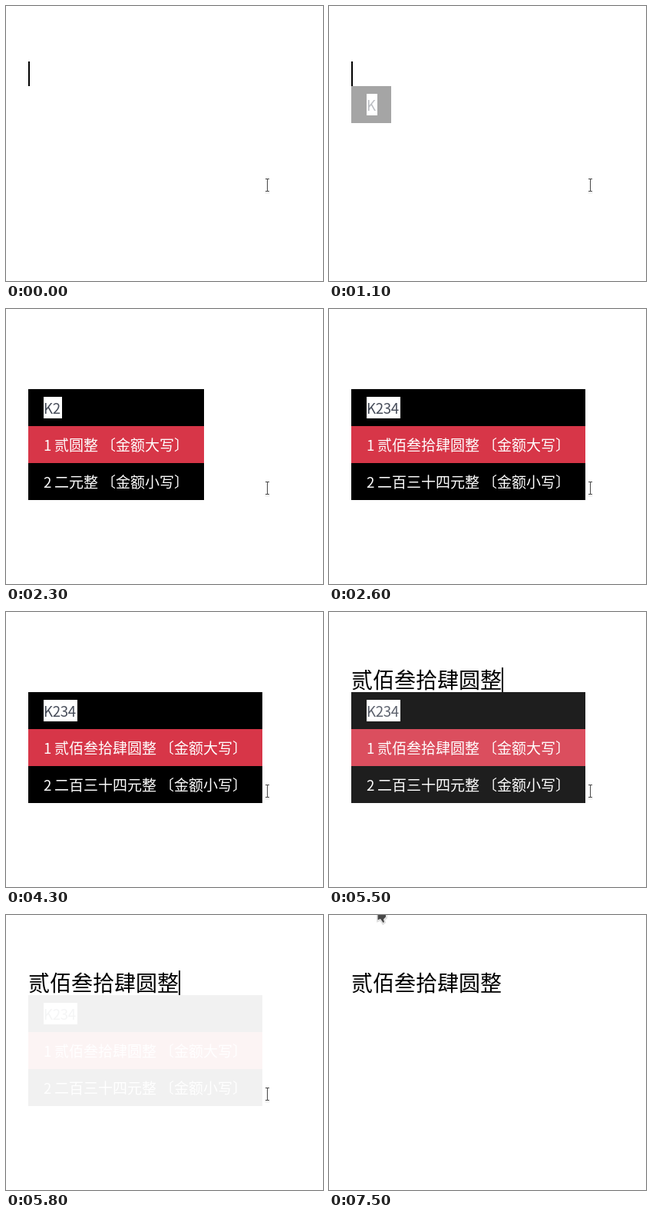
Animation of 413 by 357 pixels, one loop 7.6 s. Source, as an HTML page:

```html
<!DOCTYPE html>
<html lang="zh-CN">
<head>
<meta charset="utf-8">
<title>金额输入</title>
<style>
  html, body { margin: 0; width: 100%; height: 100%; overflow: hidden; background: #fff; }
  svg { display: block; }
  text {
    font-family: "Noto Sans CJK SC", "Noto Sans CJK", "Noto Sans", sans-serif;
    font-size: 19px;
    fill: #fff;
    text-spacing-trim: space-all;
  }
  #typed { font-size: 28px; fill: #000; }
  #code { font-size: 18.67px; letter-spacing: -.3px; fill: #454b58; }
  .num { font-size: 18.67px; }
</style>
</head>
<body>
<svg width="413" height="357" viewBox="0 0 413 357">
  <text id="typed" x="29" y="99">贰佰叁拾肆圆整</text>
  <rect id="caret" y="72" width="2" height="32"/>

  <g id="panel">
    <rect id="head" x="29" y="104" height="48"/>
    <rect id="field" x="49" y="114" height="28" fill="#fff"/>
    <text id="code" x="49" y="136"></text>
    <g id="list">
      <rect class="row" x="29" y="152" height="48" fill="#d73648"/>
      <rect class="row" x="29" y="200" height="48"/>
      <text class="num" x="49" y="184">1</text>
      <text class="num" x="49" y="232">2</text>
      <text class="word" x="63" y="184"></text>
      <text class="word" x="63" y="232"></text>
      <text class="note" y="184">〔金额大写〕</text>
      <text class="note" y="232">〔金额小写〕</text>
    </g>
  </g>

  <g id="beam">
    <path d="M-3 10h6" stroke="#000" stroke-opacity=".12" fill="none"/>
    <path d="M-2.5 -8h5M0 -8V8M-2.5 8h5" stroke="#fff" stroke-width="3" fill="none"/>
    <path d="M-2.5 -8h5M0 -8V8M-2.5 8h5" stroke="#484848" fill="none"/>
  </g>
  <g id="arrow">
    <path d="M0 1V21L3.5 19.5L7 24.5L9 23L8 19.5L11 17V13Z" fill="none" stroke="#000" stroke-opacity=".13" stroke-width="3"/>
    <path d="M0 0V20L3.5 18.5L7 23.5L8.5 22.5L7.5 19L10.5 16V12Z" fill="#484848" stroke="#fff" stroke-width="1" paint-order="stroke"/>
  </g>
</svg>
<script>
const LOOP = 7600, TICK = 100, COMMIT = 5500;
const $ = id => document.getElementById(id);
const all = name => [...document.querySelectorAll(name)];
const show = (el, on) => el.setAttribute("visibility", on ? "visible" : "hidden");

// [start, code, formal numeral, plain numeral]
const typing = [
  [1100, "K", "", ""],
  [2200, "K2", "贰圆整", "二元整"],
  [2400, "K23", "贰拾叁圆整", "二十三元整"],
  [2600, "K234", "贰佰叁拾肆圆整", "二百三十四元整"]
];
const fades = [
  [0, 0], [1100, .35], [1200, .75], [1300, 1],
  [5500, .88], [5600, .6], [5700, .32], [5800, .05], [6400, 0]
];
const latest = (steps, t) => steps.filter(s => s[0] <= t).pop();

function caretOn(t) {
  if (t < COMMIT) return Math.floor((t + 200) / 500) % 2 === 0;
  return t < 6400 || (t >= 6900 && t < 7400);
}

function drawPanel(t) {
  $("panel").setAttribute("opacity", latest(fades, t)[1]);
  const [, code, formal, plain] = latest(typing, t) || typing[0];
  const n = formal.length;
  const width = n ? 153 + 19 * n + 19 : 52;
  $("code").textContent = code;
  $("field").setAttribute("width", 4 + 10 * code.length);
  $("head").setAttribute("width", width);
  $("list").setAttribute("display", n ? "inline" : "none");
  all(".row").forEach(r => r.setAttribute("width", width));
  all(".word").forEach((w, i) => w.textContent = [formal, plain][i]);
  all(".note").forEach(e => e.setAttribute("x", 67 + 19 * n));
}

function drawPointer(t) {
  const u = Math.min(1, Math.max(0, (t - 6500) / 700));
  const e = u * u * (3 - 2 * u);
  const x = Math.round(340 - 277 * e) + .5;
  const y = Math.round(232 - 248 * e) + (t >= 7500 ? 2 : 0) + .5;
  const over = y < 8;
  show($("beam"), !over);
  show($("arrow"), over);
  $(over ? "arrow" : "beam").setAttribute("transform", `translate(${x} ${y})`);
}

function draw(t) {
  const done = t >= COMMIT;
  show($("typed"), done);
  show($("caret"), caretOn(t));
  $("caret").setAttribute("x", done ? 225 : 29);
  drawPanel(t);
  drawPointer(t);
}

const start = performance.now();
function frame() {
  const t = (performance.now() - start) % LOOP;
  draw(Math.floor(t / TICK) * TICK);
  requestAnimationFrame(frame);
}
frame();
</script>
</body>
</html>
```
